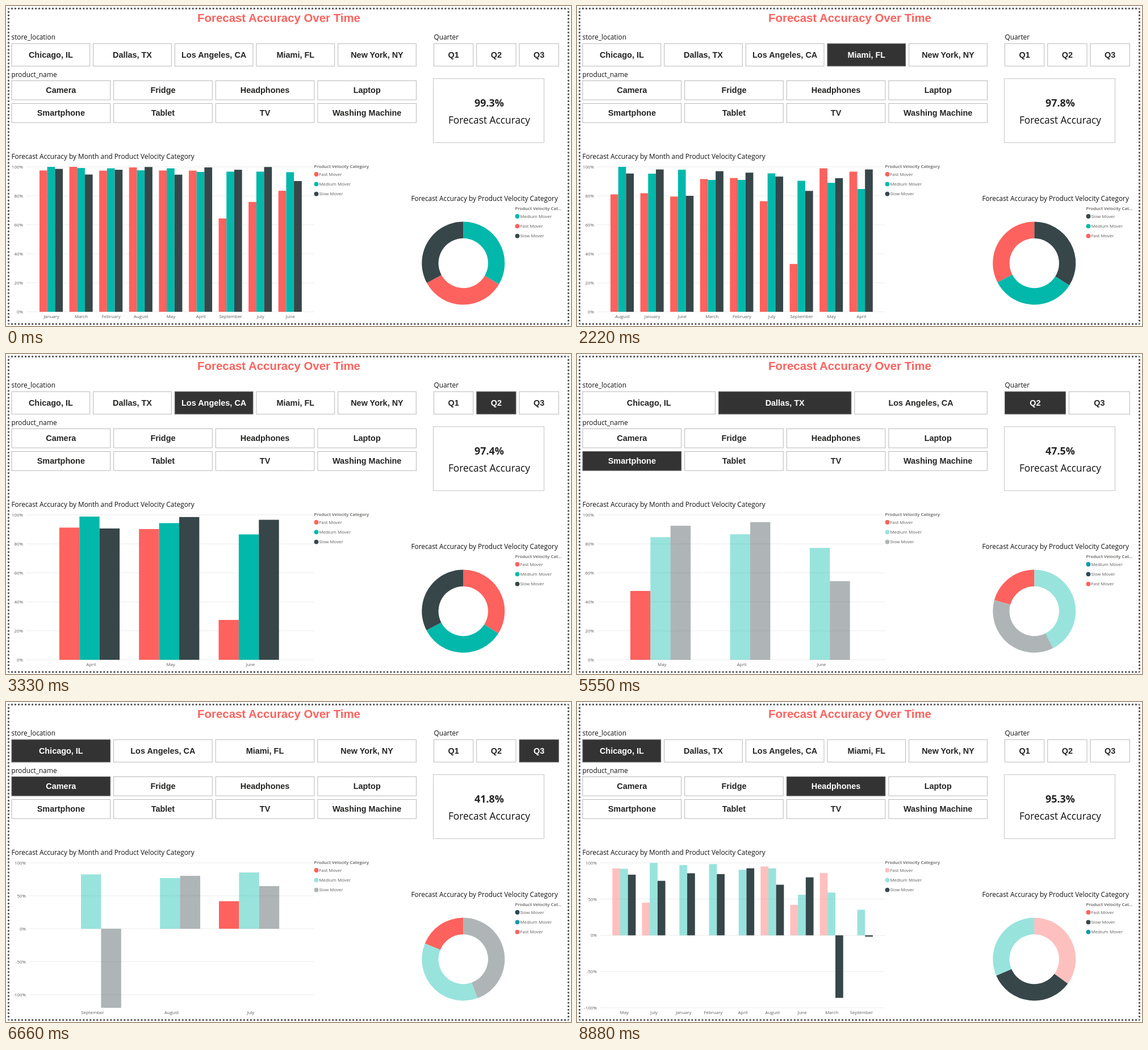
Animation, 995 px wide and 563 px high, one loop 9990 ms. Source, as an HTML page:

```html
<!DOCTYPE html>
<html lang="en">
<head>
<meta charset="utf-8">
<title>Forecast Accuracy Over Time</title>
<style>
  html, body { margin: 0; width: 100%; height: 100%; overflow: hidden; background: #fff; }
  svg { display: block; width: 995px; height: 563px; font-family: "Open Sans", "Noto Sans", sans-serif; }
  .title, .button { font-family: "Liberation Sans", Arial, sans-serif; font-weight: 700; text-anchor: middle; }
  .title { font-size: 20.4px; fill: #fd625e; }
  .button { font-size: 14.45px; }
  .head { font-size: 11.84px; fill: #111; }
  .value { font-size: 17.9px; font-weight: 700; text-anchor: middle; fill: #252423; }
  .label { font-size: 17.35px; text-anchor: middle; fill: #111; }
  .small { font-size: 7.85px; fill: #605e5c; }
  .strong { font-weight: 600; font-size: 7.8px; }
  .mid { text-anchor: middle; }
  .end { text-anchor: end; }
  .frame { fill: none; stroke: #5c5c5c; stroke-width: 3; stroke-dashoffset: 1.5; }
</style>
</head>
<body>
<svg id="stage" viewBox="0 0 995 563"></svg>
<script>
const STEP = 1110;
const LOOP = 9 * STEP;
const COLORS = { Fast: '#fd625e', Medium: '#01b8aa', Slow: '#374649' };
const KINDS = Object.keys(COLORS);
const CITIES = ['Chicago, IL', 'Dallas, TX', 'Los Angeles, CA', 'Miami, FL', 'New York, NY'];
const PRODUCTS = ['Camera', 'Fridge', 'Headphones', 'Laptop', 'Smartphone', 'Tablet', 'TV', 'Washing Machine'];
const QUARTERS = ['Q1', 'Q2', 'Q3'];
const NINE = { left: 36, center: 79.5, pitch: 52.6, bar: 13.7, shift: 0.5, min: 0, tick: 20 };
const THREE = { ...NINE, center: 147, pitch: 140.3, bar: 35.4, shift: 2.8 };

// Bars: month, fast, medium, slow. Ring: kinds in order and the two inner boundaries in degrees.
const overview = {
  on: [], value: '99.3%', axis: NINE,
  bars: [
    ['January', 97.5, 100, 98.6], ['March', 100, 99.2, 94.7], ['February', 97.4, 99, 98],
    ['August', 99.6, 97.6, 99.9], ['May', 97.5, 99, 94.6], ['April', 97.4, 96.5, 99.6],
    ['September', 64.4, 96.7, 98], ['July', 75.8, 96.7, 99.9], ['June', 83.5, 96.3, 90.2]
  ],
  ring: ['Medium', 'Fast', 'Slow'], cuts: [120.5, 241.5]
};
const miami = {
  on: ['Miami, FL'], value: '97.8%', axis: NINE,
  bars: [
    ['August', 81, 100, 95.4], ['January', 81.8, 95.3, 98.2], ['June', 79.5, 98, 80],
    ['March', 91.6, 91, 97], ['February', 92.3, 91, 96], ['July', 76.3, 95.5, 93.3],
    ['September', 33, 90.4, 83.4], ['May', 99, 89, 92.2], ['April', 96.7, 84.7, 98.2]
  ],
  ring: ['Slow', 'Medium', 'Fast'], cuts: [122.3, 242.7]
};
const losAngeles = {
  on: ['Los Angeles, CA', 'Q2'], value: '97.4%', axis: THREE,
  bars: [['April', 91.2, 98.8, 90.6], ['May', 90.2, 94.3, 98.5], ['June', 27.5, 86.5, 96.6]],
  ring: ['Fast', 'Medium', 'Slow'], cuts: [122.3, 242.7]
};
const dallas = {
  on: ['Dallas, TX', 'Smartphone', 'Q2'], value: '47.5%', axis: THREE, focus: 'Fast',
  cities: CITIES.slice(0, 3), quarters: ['Q2', 'Q3'],
  bars: [['May', 47.5, 84.6, 92.5], ['April', 0, 86.6, 95], ['June', 0, 77.2, 54.3]],
  ring: ['Medium', 'Slow', 'Fast'], cuts: [153.3, 285.5]
};
const chicagoCamera = {
  on: ['Chicago, IL', 'Camera', 'Q3'], value: '41.8%', focus: 'Fast',
  cities: CITIES.filter(city => city !== 'Dallas, TX'),
  axis: { ...THREE, left: 41, center: 149.7, pitch: 139.2, min: -120, tick: 50 },
  bars: [['September', 0, 82.5, -120], ['August', 0, 77, 80.3], ['July', 41.8, 85.5, 64.7]],
  ring: ['Slow', 'Medium', 'Fast'], cuts: [160, 292.3]
};
const chicagoAllQuarters = { ...chicagoCamera, on: ['Chicago, IL', 'Camera'] };
const chicagoHeadphones = {
  on: ['Chicago, IL', 'Headphones'], value: '95.3%', focus: 'Slow',
  axis: { ...NINE, left: 41, center: 82.8, pitch: 52.2, min: -100, tick: 50 },
  bars: [
    ['May', 92.3, 91.8, 83.7], ['July', 45, 99.8, 75.2], ['January', 0, 97, 85.6],
    ['February', 0, 98.3, 84.5], ['April', 0, 90.5, 92.5], ['August', 95, 92.5, 69.8],
    ['June', 42, 56, 80], ['March', 86, 59, -86.3], ['September', 0, 35.3, -1.8]
  ],
  ring: ['Fast', 'Slow', 'Medium'], cuts: [126, 246.5]
};
const SCENES = [
  overview, overview, miami, losAngeles, dallas, dallas,
  chicagoCamera, chicagoAllQuarters, chicagoHeadphones
];

const text = (x, y, cls, str, extra = '') => `<text x="${x}" y="${y}" class="${cls}" ${extra}>${str}</text>`;
const rect = (x, y, w, h, attrs) => `<rect x="${x}" y="${y}" width="${w}" height="${h}" ${attrs}/>`;
const fade = (scene, kind) => scene.focus && scene.focus !== kind ? 0.4 : 1;

function buttonRow(names, on, left, right, top, height) {
  const gap = 6;
  const width = (right - left - gap * (names.length - 1)) / names.length;
  return names.map((name, i) => {
    const x = left + i * (width + gap);
    const active = on.includes(name);
    return rect(x, top, width, height, `fill="${active ? '#333' : '#fff'}" stroke="${active ? '#666' : '#b8b8b8'}"`)
      + text(x + width / 2, top + height / 2 + 5, 'button', name, `fill="${active ? '#fff' : '#252423'}"`);
  }).join('');
}

function legend(x, y, title, items) {
  return text(x, y + 3, 'small strong', title) + items.map(({ kind, color, opacity = 1 }, i) => {
    const cy = y + 14 + i * 17.3;
    return `<circle cx="${x + 4}" cy="${cy}" r="3.9" fill="${color}" opacity="${opacity}"/>`
      + text(x + 9, cy + 2.8, 'small', kind + ' Mover');
  }).join('');
}

function barChart(scene) {
  const { left, center, pitch, bar, shift, min, tick } = scene.axis;
  const yOf = v => 283 + (100 - v) * 255 / (100 - min);
  let out = '';
  for (let v = 100; v >= min; v -= tick) {
    const y = yOf(v);
    out += `<path d="M${left} ${y}H542.5" stroke="#ebebeb"/>`
      + text(left - 6, y + 2.8, 'small end', v + '%');
  }
  scene.bars.forEach(([month, ...values], i) => {
    const mid = center + i * pitch;
    values.forEach((v, k) => {
      const y = yOf(Math.max(v, 0));
      out += rect(mid + (k - 1.5) * bar, y, bar, yOf(Math.min(v, 0)) - y,
        `fill="${COLORS[KINDS[k]]}" opacity="${fade(scene, KINDS[k])}"`);
    });
    out += text(mid + shift, 549.3, 'small mid', month);
  });
  return out;
}

function donut(scene) {
  const point = (r, deg) => {
    const a = deg * Math.PI / 180;
    return `${805.3 + r * Math.sin(a)} ${452.5 - r * Math.cos(a)}`;
  };
  const edges = [0, ...scene.cuts, 360];
  return scene.ring.map((kind, i) => {
    const [from, to] = [edges[i], edges[i + 1]];
    const large = to - from > 180 ? 1 : 0;
    return `<path d="M${point(73, from)}A73 73 0 ${large} 1 ${point(73, to)}`
      + `L${point(43.7, to)}A43.7 43.7 0 ${large} 0 ${point(43.7, from)}Z" `
      + `fill="${COLORS[kind]}" opacity="${fade(scene, kind)}"/>`;
  }).join('');
}

function ringColor(scene, kind) {
  if (scene.focus && kind === 'Medium') return '#1299ae';
  if (scene.focus === 'Fast' && kind === 'Slow') return '#2e4755';
  return COLORS[kind];
}

function draw(scene) {
  const { on, cities = CITIES, quarters = QUARTERS } = scene;
  return '<path class="frame" stroke-dasharray="3 3.012" d="M4.5 4.5H990.5M4.5 559.5H990.5"/>'
    + '<path class="frame" stroke-dasharray="3 3.033" d="M4.5 4.5V559.5M990.5 4.5V559.5"/>'
    + text(480.5, 28, 'title', 'Forecast Accuracy Over Time')
    + text(9.5, 59, 'head', 'store_location')
    + buttonRow(cities, on, 10, 722.3, 66.2, 39.6)
    + text(9.5, 124.5, 'head', 'product_name')
    + buttonRow(PRODUCTS.slice(0, 4), on, 10, 722.5, 131.5, 33.6)
    + buttonRow(PRODUCTS.slice(4), on, 10, 722.5, 171.5, 33.6)
    + text(753.5, 59, 'head', 'Quarter')
    + buttonRow(quarters, on, 753.5, 973.3, 66.2, 39.6)
    + rect(752.5, 127.8, 195, 112.5, 'fill="#fff" stroke="#c4c4c4"')
    + text(851, 176.5, 'value', scene.value)
    + text(851, 207.3, 'label', 'Forecast Accuracy')
    + text(9.5, 269, 'head', 'Forecast Accuracy by Month and Product Velocity Category')
    + barChart(scene)
    + legend(542.5, 282, 'Product Velocity Category',
      KINDS.map(kind => ({ kind, color: COLORS[kind], opacity: fade(scene, kind) })))
    + text(713.5, 343, 'head', 'Forecast Accuracy by Product Velocity Category')
    + donut(scene)
    + legend(896.5, 356, 'Product Velocity Cat...',
      scene.ring.map(kind => ({ kind, color: ringColor(scene, kind) })));
}

const stage = document.getElementById('stage');
const start = performance.now();
let shown = null;

function update() {
  const elapsed = Math.max(0, performance.now() - start) % LOOP;
  const scene = SCENES[Math.floor(elapsed / STEP)];
  if (scene !== shown) {
    stage.innerHTML = draw(scene);
    shown = scene;
  }
  requestAnimationFrame(update);
}
update();
</script>
</body>
</html>
```
